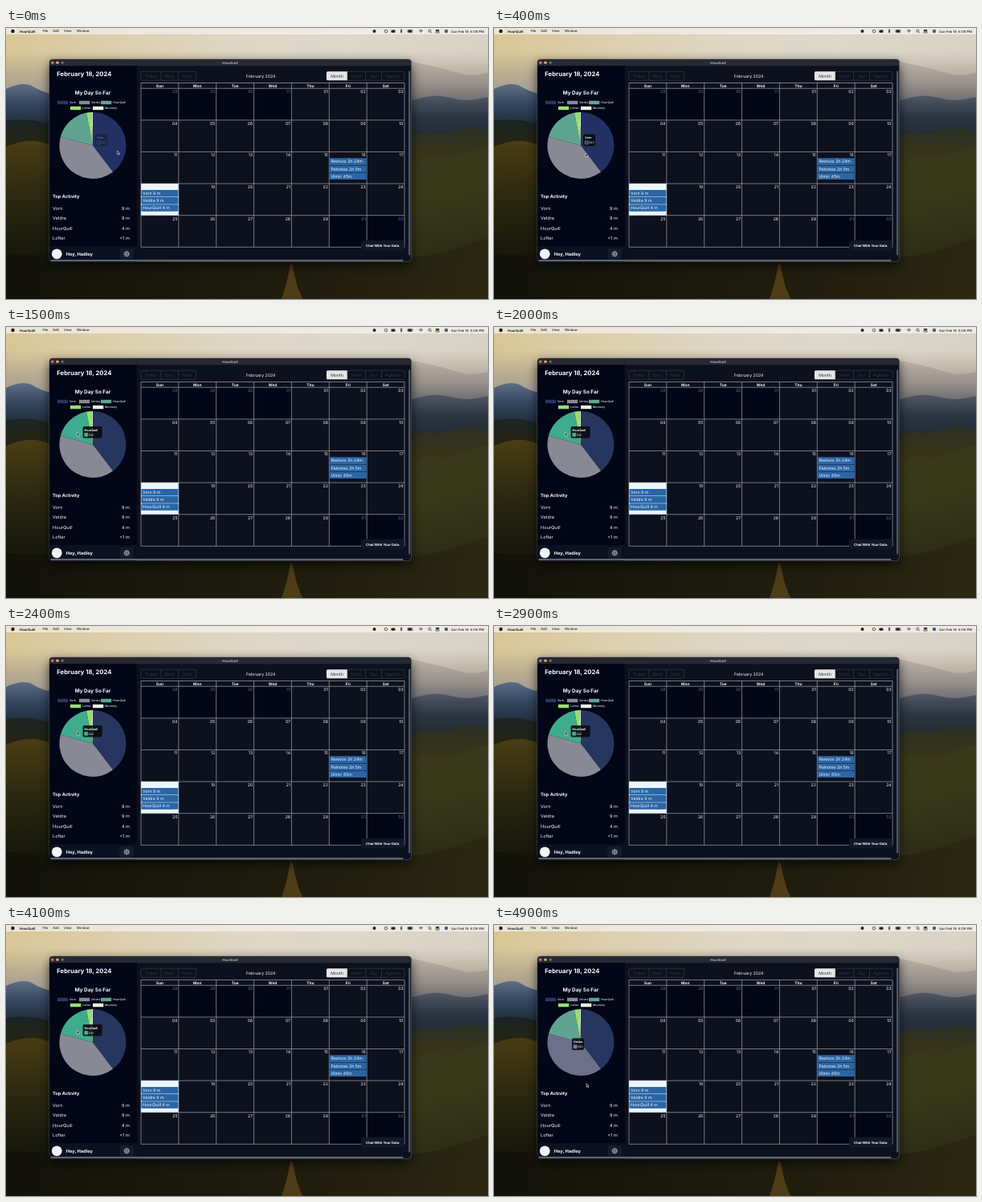
An HTML page with a canvas that plays this animation: 600x338 px, repeating every 5000 ms.

```html
<!DOCTYPE html>
<html lang="en">
<head>
<meta charset="utf-8">
<title>HourQuill</title>
<style>
html, body { margin: 0; width: 100%; height: 100%; overflow: hidden; background: #14140c; }
canvas { display: block; width: 600px; height: 338px; }
</style>
</head>
<body>
<canvas id="stage"></canvas>
<script>
const canvas = document.getElementById('stage');
const ctx = canvas.getContext('2d');
const scale = window.devicePixelRatio || 1;
canvas.width = 600 * scale;
canvas.height = 338 * scale;

const LOOP = 5000, STEP = 100;
const WHITE = '#f8fafc', BLUE = '#2a66a6', LINE = '#b9bdc4';
const APP = 'HourQuill';
const slices = [
  { name: 'Vorn', value: 540, color: '#27365f', hover: '#223063', time: '9 m' },
  { name: 'Veldra', value: 540, color: '#888994', hover: '#6d708a', time: '9 m' },
  { name: APP, value: 240, color: '#5fa48f', hover: '#3fac8d', time: '4 m' },
  { name: 'Lofter', value: 34, color: '#98df72', time: '<1 m' },
  { name: 'Murmoly', value: 8, color: '#e9f6dc' }
];
const PIE = { x: 108, y: 146.5, r: 41.5 };
const total = slices.reduce((sum, s) => sum + s.value, 0);
let turn = 0;
for (const s of slices) {
  s.from = turn / total * Math.PI * 2 - Math.PI / 2;
  turn += s.value;
  s.to = turn / total * Math.PI * 2 - Math.PI / 2;
  const mid = (s.from + s.to) / 2;
  s.x = PIE.x + Math.cos(mid) * PIE.r / 2;
  s.y = PIE.y + Math.sin(mid) * PIE.r / 2;
}

// Pointer path as [ms, x, y]; hovers as [ms, slice]
const path = [[0, 138.5, 153], [200, 132, 156], [500, 105, 156], [900, 95, 141],
  [1200, 88.5, 131.5], [4700, 88.5, 131.5], [4800, 97, 162], [4900, 115, 197.5]];
const hovers = [[-100, 0], [450, 1], [1000, 2], [4830, 1]];

function rect(x, y, w, h, fill, r = 0, stroke) {
  ctx.beginPath();
  ctx.roundRect(x, y, w, h, r);
  if (fill) { ctx.fillStyle = fill; ctx.fill(); }
  if (stroke) { ctx.strokeStyle = stroke; ctx.stroke(); }
}
function circle(x, y, r, fill, stroke) {
  rect(x - r, y - r, r * 2, r * 2, fill, r, stroke);
}
// Set large and scaled down, so that tiny type keeps its true widths
function text(str, x, y, size, color = WHITE, weight = 400, align = 'left') {
  ctx.save();
  ctx.translate(x, y + size * 0.36);
  ctx.scale(size / 40, size / 40);
  ctx.font = `${weight} 40px Inter, Roboto, sans-serif`;
  ctx.textRendering = 'geometricPrecision';
  ctx.textAlign = align;
  ctx.fillStyle = color;
  ctx.fillText(str, 0, 0);
  ctx.restore();
}
function line(...pts) {
  ctx.beginPath();
  for (let i = 0; i < pts.length; i += 2) ctx.lineTo(pts[i], pts[i + 1]);
  ctx.stroke();
}
function gradient(x0, y0, x1, y1, colors) {
  const g = ctx.createLinearGradient(x0, y0, x1, y1);
  colors.forEach((c, i) => g.addColorStop(i / (colors.length - 1), c));
  return g;
}
function hill(fill, pts) {
  ctx.beginPath();
  ctx.moveTo(pts[0], 338);
  ctx.lineTo(pts[0], pts[1]);
  for (let i = 2; i < pts.length - 2; i += 2)
    ctx.quadraticCurveTo(pts[i], pts[i + 1], (pts[i] + pts[i + 2]) / 2, (pts[i + 1] + pts[i + 3]) / 2);
  ctx.lineTo(pts.at(-2), pts.at(-1));
  ctx.lineTo(pts.at(-2), 338);
  ctx.fillStyle = fill;
  ctx.fill();
}

function drawLandscape() {
  rect(0, 0, 600, 338, gradient(0, 0, 600, 0, ['#d9c695', '#ddd0b0', '#dfd7c6', '#ddd7cb', '#d9d2c6']));
  rect(0, 28, 600, 60, gradient(0, 28, 0, 88, ['#b5a89000', '#a89d8caa', '#9a9894']));
  hill(gradient(0, 40, 0, 100, ['#bdb3a8', '#978f8a', '#5d6069']), [440, 70, 480, 36, 515, 44, 550, 52, 575, 60, 600, 56]);
  hill(gradient(0, 66, 0, 125, ['#64738a', '#33465f', '#1c2832']), [0, 76, 22, 66, 45, 80, 70, 84, 300, 120]);
  hill(gradient(0, 82, 0, 140, ['#545b68', '#2b3543', '#202a2e']), [420, 108, 500, 92, 535, 82, 570, 92, 600, 86]);
  hill(gradient(0, 112, 0, 190, ['#1b2426', '#25240f', '#3a3212']), [0, 116, 25, 112, 60, 122, 300, 180]);
  hill(gradient(0, 140, 0, 338, ['#4a3d14', '#2d2a10', '#191a0c', '#12120a']), [0, 148, 25, 138, 60, 146, 300, 260, 600, 290]);
  hill(gradient(0, 122, 0, 200, ['#2a2f26', '#383518', '#403b17']), [440, 160, 510, 128, 545, 134, 575, 122, 600, 130]);
  hill(gradient(500, 145, 540, 338, ['#38391c', '#39391a', '#2f2f15', '#211f0e']), [400, 290, 490, 190, 520, 158, 550, 166, 575, 154, 600, 148]);
  hill(gradient(0, 285, 600, 338, ['#12120a', '#1a180c', '#211e0e', '#2b2812']), [0, 282, 120, 285, 300, 292, 420, 288, 520, 288, 600, 262]);
  hill('#5c451bcc', [343, 338, 350, 318, 355, 286, 361, 318, 369, 338]);
}

function drawMenuBar() {
  rect(0, 0, 600, 8, gradient(0, 0, 600, 0, ['#ece5d4', '#eeeae2', '#efece7']));
  const ink = '#22221f';
  circle(8.5, 4, 2.2, '#111');
  text(APP, 17, 4, 4.2, ink, 700);
  [['File', 45.5], ['Edit', 58.5], ['View', 72], ['Window', 88]].forEach(([s, x]) => text(s, x, 4, 4.1, ink, 500));
  ctx.lineWidth = 0.7;
  circle(458.5, 4, 2, ink);
  circle(473, 4, 1.8, null, ink);
  rect(479.5, 2.5, 5, 3.2, ink, 0.6);
  ctx.strokeStyle = ink;
  line(490.8, 2.6, 493.2, 5, 492, 6.2, 492, 1.6, 493.2, 2.8, 490.8, 5.2);
  rect(500, 2.4, 6, 3.2, null, 0.8, ink);
  rect(500.6, 3, 4.4, 2, ink);
  for (const r of [1, 2.2, 3.4]) {
    ctx.beginPath();
    ctx.arc(516.5, 6, r, Math.PI * 1.25, Math.PI * 1.75);
    ctx.stroke();
  }
  circle(527.3, 3.6, 1.5, null, ink);
  line(528.4, 4.7, 529.8, 6.1);
  rect(534.8, 2, 4.6, 1.7, ink, 0.8);
  rect(534.8, 4.4, 4.6, 1.7, null, 0.8, ink);
  circle(548, 4, 2.2, '#4d5878');
  text('Sun Feb 18  6:09 PM', 595, 4, 4.2, ink, 500, 'right');
}

function drawWindow() {
  ctx.save();
  ctx.shadowColor = '#000a';
  ctx.shadowBlur = 14 * scale;
  ctx.shadowOffsetY = 5 * scale;
  rect(54, 39, 450.5, 252.5, '#0d111e', 4);
  ctx.restore();
  ctx.lineWidth = 0.6;
  rect(54, 39, 450.5, 252.5, null, 4, '#596070');
  rect(54.3, 39.3, 450, 8, '#272932', [4, 4, 0, 0]);
  ['#ee6a5f', '#e5ae4b', '#6a6c70'].forEach((c, i) => circle(57.8 + i * 6.2, 43.2, 1.7, c));
  text(APP, 279, 43.2, 4.2, '#b4b6ba', 700, 'center');
  rect(54.3, 47.3, 108.7, 244, '#020617', [0, 0, 0, 4]);
}

function drawSidebar() {
  text('February 18, 2024', 63.3, 56.8, 7.7, WHITE, 700);
  text('My Day So Far', 108, 81, 6.4, WHITE, 700, 'center');
  [[64, 93], [91, 93], [118, 93], [80, 100], [108, 100]].forEach(([x, y], i) => {
    rect(x, y - 2.2, 13.3, 4.4, slices[i].color);
    text(slices[i].name, x + 15, y, 3.6, '#dfe2e8', 500);
  });
  text('Top Activity', 58, 209.9, 5.7, WHITE, 700);
  slices.slice(0, 4).forEach((s, i) => {
    const y = 224.7 + i * 12.5;
    text(s.name, 58, y, 5.6);
    text(s.time, 154, y, 5.6, WHITE, 400, 'right');
  });
  rect(54.3, 272, 108.7, 19.2, '#0b1120', [0, 0, 0, 4]);
  circle(63.3, 281.8, 6.4, '#f3f4f6');
  text('Hey, Hadley', 74.7, 281.8, 5.7, WHITE, 700);
  rect(141.5, 275, 17.5, 13.5, '#151c2c', 2);
  ctx.lineWidth = 0.8;
  circle(150.2, 281.8, 2.7, null, '#d5d8de');
  circle(150.2, 281.8, 1.1, null, '#d5d8de');
  for (let a = 0; a < 8; a++) {
    const c = Math.cos(a * Math.PI / 4), s = Math.sin(a * Math.PI / 4);
    line(150.2 + c * 2.8, 281.8 + s * 2.8, 150.2 + c * 3.7, 281.8 + s * 3.7);
  }
}

function drawButtons(edges, labels, active) {
  ctx.lineWidth = 0.6;
  const end = edges.at(-1);
  rect(edges[0], 54.3, end - edges[0], 11, null, 1.5, '#3b414d');
  labels.forEach((s, i) => {
    const x = edges[i], w = edges[i + 1] - x;
    if (i === active) rect(x, 54.3, w, 11, '#e6e6e6', [1.5, 0, 0, 1.5]);
    else if (i) { ctx.strokeStyle = '#3b414d'; line(x, 54.3, x, 65.3); }
    text(s, x + w / 2, 59.9, 5.2, i === active ? '#2b2f36' : '#30363f', 400, 'center');
  });
}

function drawCalendar() {
  const left = 168, top = 75.3, w = 46.86, h = 39.6;
  drawButtons([168, 193, 214.5, 236.5], ['Today', 'Back', 'Next'], -1);
  drawButtons([399, 425, 447.5, 467.5, 496], ['Month', 'Week', 'Day', 'Agenda'], 0);
  text('February 2024', 317.3, 59.8, 5.2, WHITE, 400, 'center');
  for (let i = 0; i < 35; i++) {
    const x = left + i % 7 * w, y = top + Math.floor(i / 7) * h;
    const off = i < 4 || i > 32;
    const day = i < 4 ? 28 + i : i > 32 ? i - 32 : i - 3;
    if (off) rect(x, y, w, h, '#020617');
    if (day === 18) rect(x, y, w, h, '#eaf5fd');
    text(String(day).padStart(2, '0'), x + w - 1.4, y + 4.1, 5.2, off ? '#6f747d' : WHITE, 400, 'right');
  }
  ctx.lineWidth = 0.6;
  ctx.strokeStyle = LINE;
  'Sun Mon Tue Wed Thu Fri Sat'.split(' ').forEach((s, i) => {
    const x = left + i * w;
    text(s, x + w / 2, 71.9, 4.8, WHITE, 700, 'center');
    if (i) line(x, 68.5, x, top + 5 * h);
  });
  for (let r = 0; r < 5; r++) line(left, top + r * h, left + 7 * w, top + r * h);
  rect(left, 68.5, 7 * w, top + 5 * h - 68.5, null, 0, LINE);

  const events = (x, y, labels) => labels.forEach((s, i) => {
    rect(x, y + i * 9.1, 46, 8.6, BLUE, 1.2);
    text(s, x + 1.7, y + 4.3 + i * 9.1, 5.2, WHITE, 400);
  });
  events(402.7, 162.3, ['Reelvox 2h 24m', 'Palnotes 2h 5m', 'Ulmic 45m']);
  events(168.4, 202, slices.slice(0, 3).map(s => `${s.name} ${s.time}`));

  rect(442, 264.8, 53.5, 12.4, '#111827', 2);
  text('Chat With Your Data', 468.7, 271, 4.2, WHITE, 700, 'center');
  rect(501.2, 53.5, 2, 230, '#56606f', 1);
  rect(55.5, 289, 439, 1.8, '#697180', 1);
}

const ease = (t, start) => 1 - (1 - Math.min(1, Math.max(0, (t - start) / 400))) ** 4;

function drawPie(t) {
  let n = 0;
  while (n < hovers.length - 1 && hovers[n + 1][0] <= t) n++;
  const [since, index] = hovers[n];
  slices.forEach((s, i) => {
    ctx.beginPath();
    ctx.moveTo(PIE.x, PIE.y);
    ctx.arc(PIE.x, PIE.y, PIE.r, s.from, s.to);
    ctx.fillStyle = i === index ? s.hover : s.color;
    ctx.fill();
  });

  const s = slices[index], k = ease(t, since);
  const w = s.name === APP ? 24 : 15;
  const place = (item, width) => ({ x: item.x + (item === slices[0] ? -width - 1.5 : 1.7), y: item.y });
  const end = place(s, w);
  const start = n ? place(slices[hovers[n - 1][1]], w) : end;
  const x = start.x + (end.x - start.x) * k;
  const y = start.y + (end.y - start.y) * k;
  ctx.save();
  ctx.globalAlpha = n ? 1 : Math.min(1, 0.35 + t / 400);
  rect(x, y - 7.3, w, 14.6, '#080a0ee0', 1.8);
  text(s.name, x + 2, y - 3, 3.6, WHITE, 700);
  ctx.lineWidth = 0.5;
  rect(x + 2.2, y + 1.2, 3.8, 3.8, s.hover, 0, '#c5c8cc');
  text(s.value, x + 6.8, y + 3.2, 3.6, '#e0e2e6');
  ctx.restore();
}

function drawPointer(t) {
  let i = 0;
  while (i < path.length - 2 && path[i + 1][0] <= t) i++;
  const [t0, x0, y0] = path[i], [t1, x1, y1] = path[i + 1];
  const k = Math.min(1, (t - t0) / (t1 - t0));
  ctx.save();
  ctx.translate(x0 + (x1 - x0) * k, y0 + (y1 - y0) * k);
  ctx.beginPath();
  [[0, 0], [0, 4.5], [1.1, 3.6], [1.9, 5.3], [2.7, 4.9], [1.9, 3.3], [3.2, 3.2]].forEach(p => ctx.lineTo(...p));
  ctx.closePath();
  ctx.fillStyle = '#08090b';
  ctx.strokeStyle = '#e8eaee';
  ctx.lineWidth = 0.6;
  ctx.fill();
  ctx.stroke();
  ctx.restore();
}

function draw(t) {
  ctx.setTransform(scale, 0, 0, scale, 0, 0);
  drawLandscape();
  drawMenuBar();
  drawWindow();
  drawSidebar();
  drawCalendar();
  drawPie(t);
  drawPointer(t);
}

const begin = performance.now();
let shown = -1;
function tick() {
  const t = Math.floor((performance.now() - begin) % LOOP / STEP) * STEP;
  if (t !== shown) draw(shown = t);
  requestAnimationFrame(tick);
}
tick();
</script>
</body>
</html>
```
